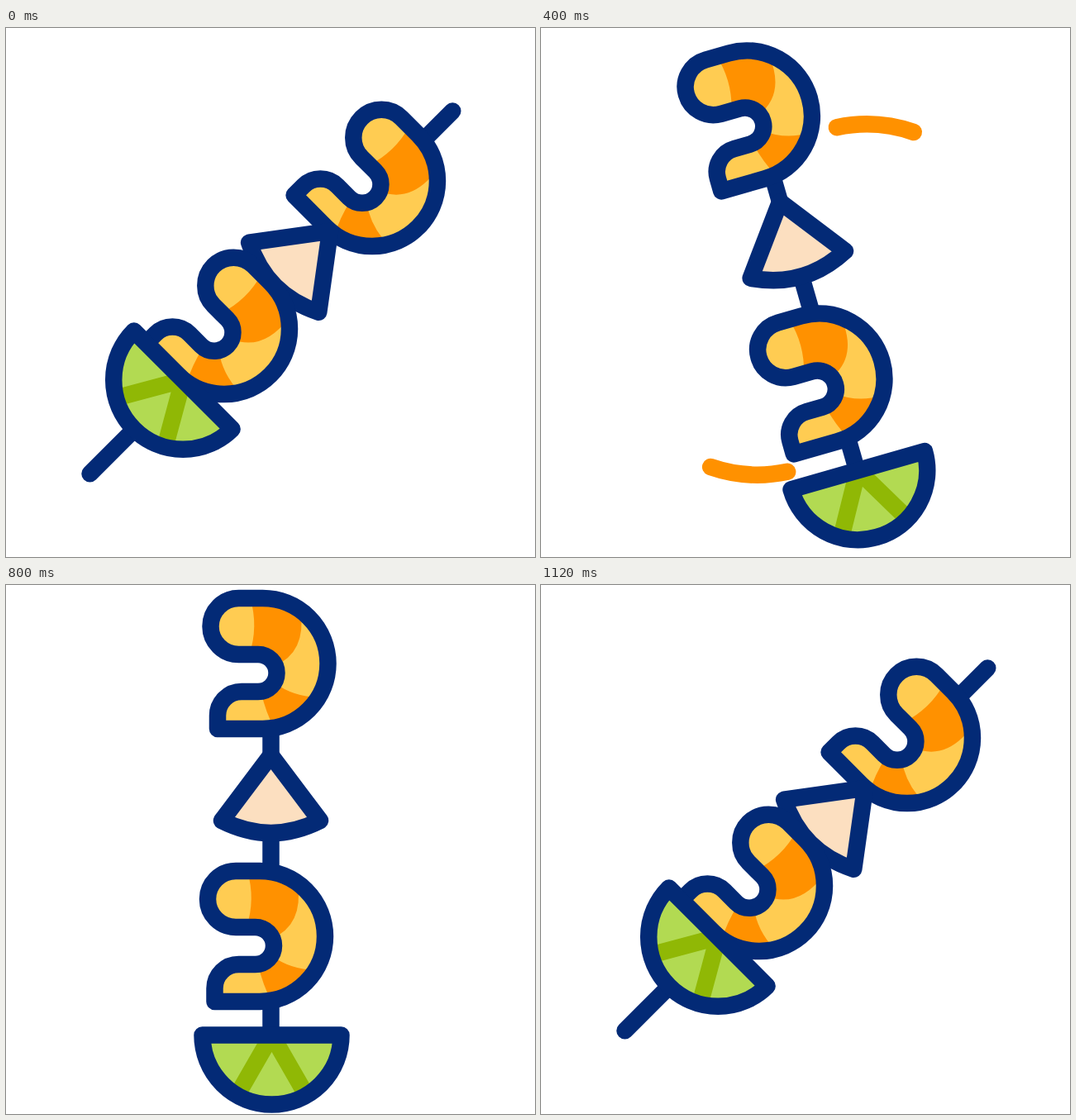
Recreate the animation shown at these times as an HTML page. Size 640x640 px, loop 2 s.

```html
<!DOCTYPE html>
<html lang="en">
<head>
<meta charset="utf-8">
<title>Shrimp skewer</title>
<style>
  html, body { margin: 0; height: 100%; overflow: hidden; background: #fff; }
  svg { display: block; width: 100vw; height: 100vh; }
  .line { stroke: #032a76; stroke-width: 20.5; stroke-linecap: round; stroke-linejoin: round; }
  .swoosh { fill: none; stroke: #ff9100; stroke-width: 20.5; stroke-linecap: round; }
</style>
</head>
<body>
<svg viewBox="0 0 640 640">
  <defs>
    <path id="body" d="M0-79H-29A34 34 0 0 0-29-11H-5.5A22.5 22.5 0 0 1-5.5 34H-25.5A29 29 0 0 0-54.5 63V79H0A79 79 0 0 0 0-79Z"/>
    <g id="shrimp">
      <use href="#body" fill="#ffcc52"/>
      <path fill="#ff9100" d="M-15-79Q-5-45-16-11H-5.5A22.5 22.5 0 0 1 14 3Q53-13 46-64A79 79 0 0 0 0-79Z
        M14 23Q36 40 68 41A79 79 0 0 1 14 78Q4 60-2 34A22.5 22.5 0 0 0 14 23Z"/>
      <use href="#body" class="line" fill="none"/>
    </g>
  </defs>
  <path id="upper" class="swoosh"/>
  <path id="lower" class="swoosh" transform="rotate(180 328 328.5)"/>
  <g id="skewer">
    <path id="stick" class="line"/>
    <use id="top" href="#shrimp"/>
    <path id="wedge" class="line" fill="#fcdfc0" d="M0-79L59.5 0Q0 30-59.5 0Z"/>
    <use id="bottom" href="#shrimp"/>
    <g id="lime">
      <path fill="#b2da52" d="M-84 0A84 84 0 0 0 84 0Z"/>
      <path fill="none" stroke="#90b805" stroke-width="20.5" stroke-linejoin="bevel" d="M-42 73L0 0L42 73"/>
      <path class="line" fill="none" d="M-84 0A84 84 0 0 0 84 0Z"/>
    </g>
  </g>
</svg>
<script>
const $ = id => document.getElementById(id);
const mix = (a, b, k) => a + (b - a) * k;

// Eased progress of t between two times
const ease = (t, from, to) => {
  const p = Math.min(1, Math.max(0, (t - from) / (to - from)));
  return p * p * (3 - 2 * p);
};

// Packed and spread positions along the stick: x, y
const parts = {
  top: [[-8.5, -182.4], [-9.5, -225]],
  wedge: [[-1.5, -24.4], [0.5, -35]],
  bottom: [[-8.5, 70.7], [-13, 105]],
  lime: [[0, 149.6], [1.5, 224.5]]
};

function drawSwoosh(t) {
  const tail = mix(20, 102, ease(t, 87, 627));
  const head = mix(20, 102, ease(t, 45, 400));
  const point = deg => {
    const a = deg * Math.PI / 180;
    return `${394 + 174 * Math.cos(a)} ${290.4 - 174 * Math.sin(a)}`;
  };
  const d = head - tail > 0.05 ? `M${point(tail)}A174 174 0 0 0 ${point(head)}` : '';
  $('upper').setAttribute('d', d);
  $('lower').setAttribute('d', d);
}

function draw(t) {
  const back = ease(t, 800, 1103);
  const spread = ease(t, 16, 412) - back;
  const angle = 45 - 61 * ease(t, 0, 400) + 16 * ease(t, 400, 800) + 45 * back;
  $('skewer').setAttribute('transform', `translate(320 320) rotate(${angle})`);

  const y = {};
  for (const [id, [packed, open]] of Object.entries(parts)) {
    y[id] = mix(packed[1], open[1], spread);
    $(id).setAttribute('transform', `translate(${mix(packed[0], open[0], spread)} ${y[id]})`);
  }

  // The stick shows only between the pieces and at both ends
  const gaps = [
    [mix(-311, -295, spread), y.top - 76],
    [y.top + 76, y.wedge - 76],
    [y.wedge + 13, y.bottom - 76],
    [y.bottom + 76, y.lime],
    [y.lime + 81, mix(309.5, 277, spread)]
  ];
  $('stick').setAttribute('d', gaps.map(([a, b]) => `M.5 ${a}V${b}`).join(''));
  drawSwoosh(t);
}

function tick() {
  draw(performance.now() % 2000);
  requestAnimationFrame(tick);
}
tick();
</script>
</body>
</html>
```
